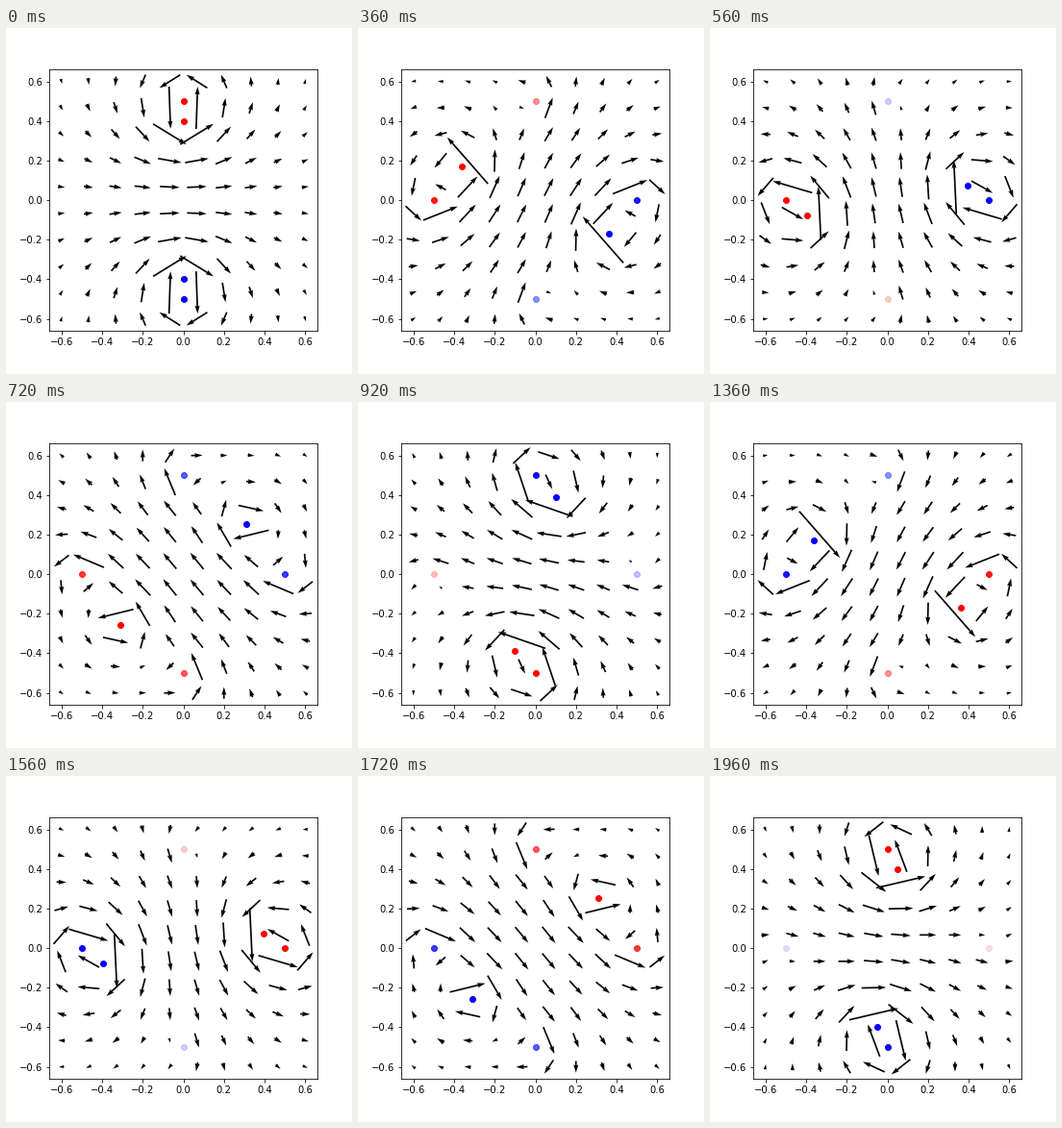
Animation, 360 px wide and 360 px high, one loop 2000 ms. Source, as a matplotlib script:

```python
import numpy as np
import matplotlib.pyplot as plt
from matplotlib.animation import FuncAnimation

FRAMES, INTERVAL = 50, 40
STATOR_R, ROTOR_R = 0.5, 0.4

axis = np.linspace(-0.6, 0.6, 10)
X, Y = np.meshgrid(axis, axis)


def wires(angle):
    """Position and current (x, y, i) of every wire at a rotor angle."""
    c, s = np.cos(angle), np.sin(angle)
    rx, ry = -ROTOR_R * s, ROTOR_R * c
    return [
        (0, STATOR_R, c), (0, -STATOR_R, -c),
        (-STATOR_R, 0, s), (STATOR_R, 0, -s),
        (rx, ry, 1), (-rx, -ry, -1),
    ]


def field(sources):
    u, v = np.zeros_like(X), np.zeros_like(Y)
    for x, y, i in sources:
        dx, dy = X - x, Y - y
        r2 = dx**2 + dy**2
        u -= i * dy / r2
        v += i * dx / r2
    return u, v


fig, ax = plt.subplots(figsize=(5, 5), dpi=72)
fig.subplots_adjust(left=0.125, right=0.9, bottom=0.125, top=0.88)
start = wires(0)
arrows = ax.quiver(X, Y, *field(start), pivot="mid")
dots = [ax.plot([], [], "o", markersize=6)[0] for _ in start]
ax.set_xlim(-0.66, 0.66)
ax.set_ylim(-0.66, 0.66)


def update(n):
    sources = wires(2 * np.pi * n / FRAMES)
    arrows.scale = None  # rescale to the current mean field
    arrows.set_UVC(*field(sources))
    for dot, (x, y, i) in zip(dots, sources):
        dot.set_data([x], [y])
        dot.set_color("red" if i > 0 else "blue")
        dot.set_alpha(min(abs(i), 1))
    return [arrows, *dots]


anim = FuncAnimation(fig, update, frames=FRAMES, interval=INTERVAL,
                     init_func=lambda: update(0), repeat=True, repeat_delay=0)
plt.show()
```
